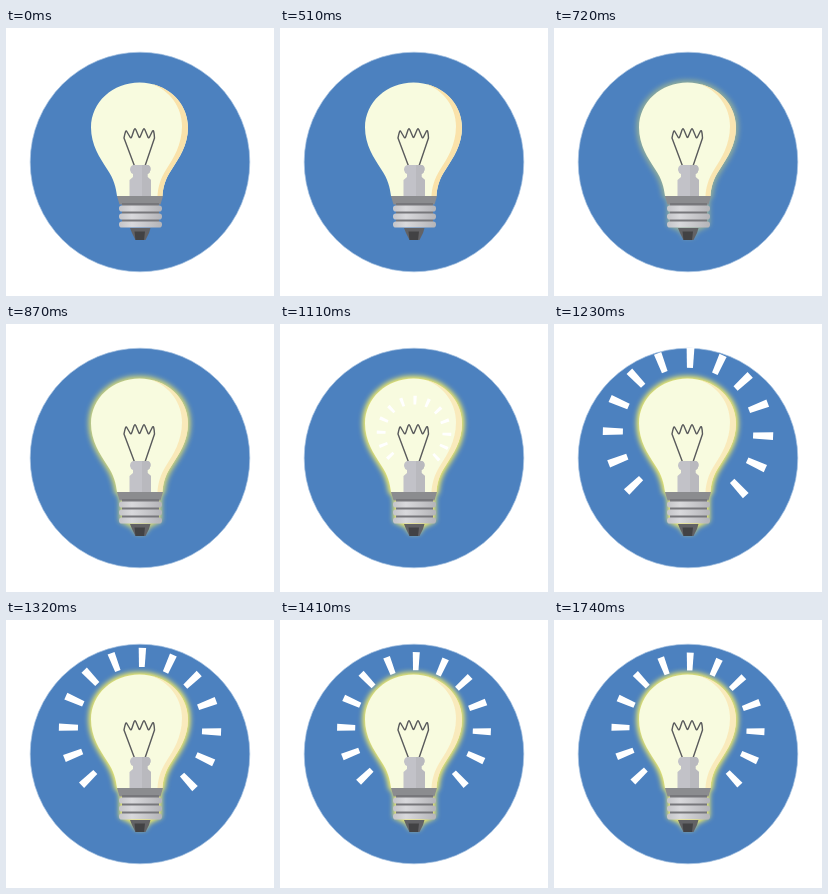
An HTML page that plays this animation: 268 px wide and 268 px high, repeating every 1800 ms.

```html
<!DOCTYPE html>
<html lang="en">
<head>
<meta charset="utf-8">
<title>Light bulb</title>
<style>
  html, body { margin: 0; width: 100%; height: 100%; overflow: hidden; background: #fff; }
  svg { display: block; width: 100%; height: 100%; }
</style>
</head>
<body>
<svg viewBox="0 0 268 268">
  <defs>
    <path id="glass" d="M85 99.500C85 74 107 54.500 133.500 54.500S182 74 182 99.500C182 117 173 130 166 141C159 151 157 160 156.500 168H111C110 160 108 151 101 141C94 130 85 117 85 99.500Z"/>
    <path id="base" d="M112 168H156L155 177V197L143 203L139 209H130L126 203L114 197V177Z"/>
    <filter id="blur" x="-20%" y="-20%" width="140%" height="140%"><feGaussianBlur stdDeviation="2.500"/></filter>
    <linearGradient id="metal">
      <stop offset="0" stop-color="#c4c4c8"/>
      <stop offset=".3" stop-color="#d9d9dc"/>
      <stop offset="1" stop-color="#b4b4b8"/>
    </linearGradient>
  </defs>

  <circle cx="134" cy="134" r="109.800" fill="#4c81bf" stroke="#a9c4e3" stroke-width=".7"/>

  <g id="glow" fill="#f5ee68" stroke="#f5ee68" stroke-linejoin="round" filter="url(#blur)">
    <use href="#glass" stroke-width="5"/><use href="#base" stroke-width="1.500"/>
  </g>

  <use href="#glass" fill="#f8fbdf"/>
  <path id="shade" fill="#fae2aa" d="M146 56C167 61 182 78 182 99.500C182 117 173 130 166 141C159 151 157 160 156.500 168H151.500C152 160 154 151 160.500 141C167 131 176 117 176 98C176 79 164 63 146 56Z"/>
  <g id="rays" fill="#fff"></g>

  <!-- Filament and its mount -->
  <path d="M128.500 138L118 110Q119.500 102 120.500 103L124 109Q125 111 126 108L128 102Q129 99.500 130 102L132.500 108Q133.500 111 134.500 108L137 102Q138 99.500 139 102L141.500 108Q142.500 111 143.500 109L146.500 103Q148 101 148.500 110L139 138" fill="none" stroke="#595a5c" stroke-width="1.400" stroke-linejoin="round"/>
  <path d="M127 137H142Q145 138 144.500 142Q144 145 141.500 146V149L145 152V168H123.500V152L127 149V146Q124.500 145 124 142Q124 138 127 137Z" fill="#c2c2c8"/>
  <path d="M136 137H142Q145 138 144.500 142Q144 145 141.500 146V149L145 152V168H136Z" fill="#b9b9be"/>

  <!-- Screw base -->
  <path d="M111 168H157L154.500 176.500H113.500Z" fill="#8b8c8f"/>
  <rect x="116" y="175" width="37" height="24" fill="#77777b"/>
  <g id="threads" fill="url(#metal)"></g>
  <path d="M124 200H144.500L143 205L139.500 212H129.500L126 205Z" fill="#626265"/>
  <path d="M128.500 203.500H139L138 212H129.500Z" fill="#424244"/>
</svg>

<script>
const LOOP = 1800, STEP = 30;
const PEAK = 1.117;
const byId = id => document.getElementById(id);
const glow = byId('glow'), shade = byId('shade'), rays = byId('rays');

const rayAngle = i => 1.7 + (i - 6) * 22.6;
rays.innerHTML = Array.from({ length: 13 }, (_, i) =>
  `<path d="M-3.500 -76.500H3.500L2.700 -58.500H-2.700Z" transform="rotate(${rayAngle(i)})"/>`).join('');

byId('threads').innerHTML = [177.5, 185.5, 193.5].map(y =>
  `<rect x="113" y="${y}" width="43" height="6" rx="2.800"/>`).join('');

const progress = (t, from, to) => Math.min(1, Math.max(0, (t - from) / (to - from)));
const smooth = p => p * p * (3 - 2 * p);

// Rays shoot out past their resting size, then settle back.
function rayScale(t) {
  return t < 1205
    ? PEAK * smooth(progress(t, 1030, 1205))
    : PEAK + (1 - PEAK) * smooth(progress(t, 1205, 1440));
}

function draw(now) {
  const t = Math.floor((now % LOOP) / STEP) * STEP;
  const lit = smooth(progress(t, 480, 1020));
  const scale = rayScale(t);
  glow.setAttribute('opacity', lit);
  shade.setAttribute('opacity', 1 - 0.35 * lit);
  rays.setAttribute('visibility', scale > 0 ? 'visible' : 'hidden');
  rays.setAttribute('transform', `translate(134 109) scale(${scale})`);
}

let start;
function tick(now) {
  start ??= now;
  draw(now - start);
  requestAnimationFrame(tick);
}
draw(0);
requestAnimationFrame(tick);
</script>
</body>
</html>
```
